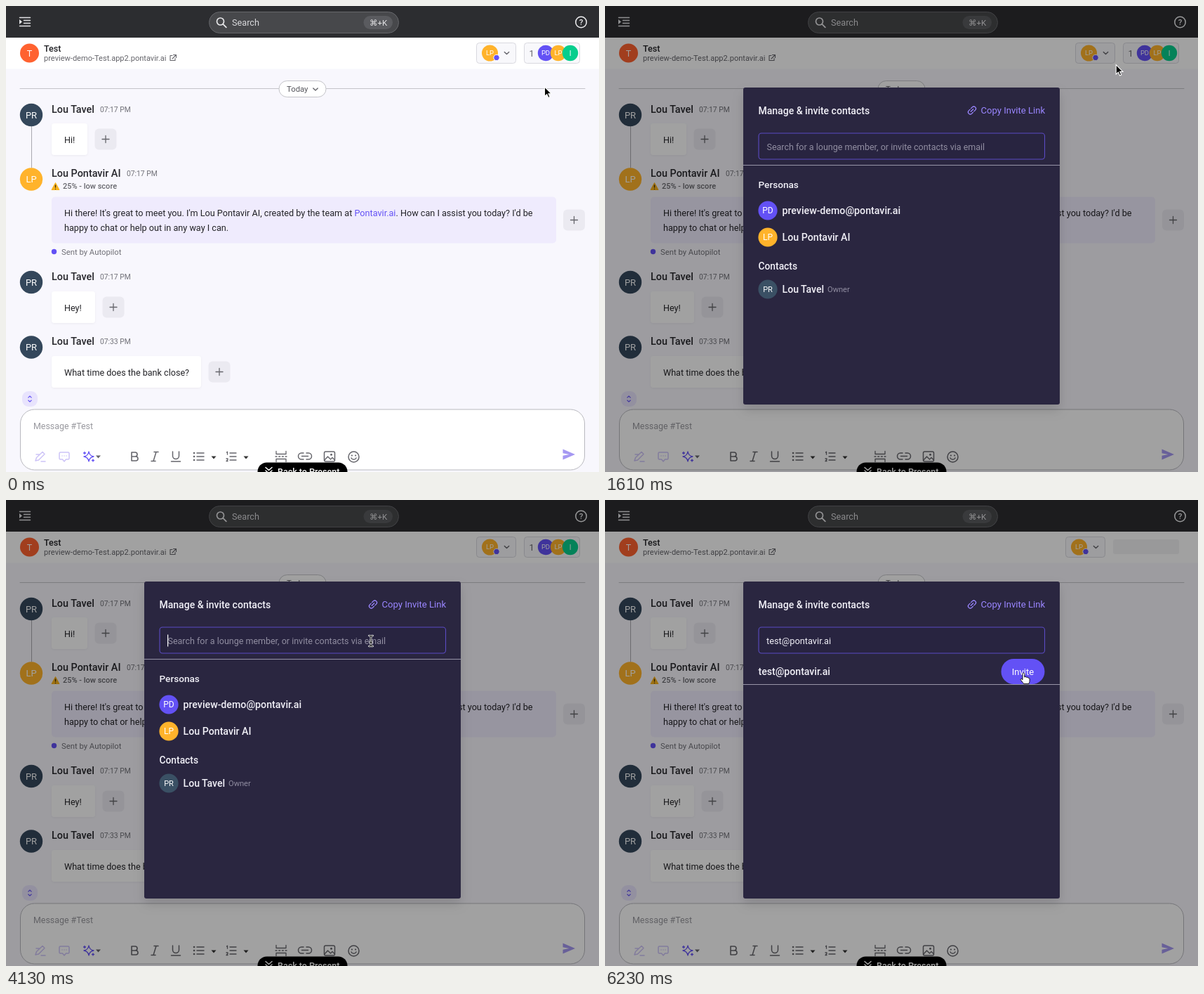
Write an HTML page that moves like this. It is 845 by 663 pixels and loops after 6.3 s.

```html
<!DOCTYPE html>
<html lang="en">
<head>
<meta charset="utf-8">
<title>Invite contacts</title>
<style>
html, body { margin: 0; width: 100%; height: 100%; overflow: hidden; background: #f8f7fd }
svg { display: block; width: 100vw; height: 100vh }
text { font: 12.6px Roboto, Arial, sans-serif; fill: #232327 }
.m { font-weight: 500 }
.mid { text-anchor: middle }
.ln { fill: none; stroke-linecap: round; stroke-linejoin: round }
</style>
</head>
<body>
<svg id="stage" viewBox="0 0 845 663"></svg>
<script>
const NAME = 'Lou Tavel', AGENT = 'Lou Pontavir AI', HOST = 'pontavir.ai';
const PURPLE = '#6351f5', ORANGE = '#ffb32b', NAVY = '#34475b';

const text = (x, y, s, size = 12.6, fill = '#232327', cls = '', more = '') =>
  `<text x="${x}" y="${y}" class="${cls}" style="font-size:${size}px;fill:${fill}" ${more}>${s}</text>`;
const rect = (x, y, w, h, r, fill, more = '') =>
  `<rect x="${x}" y="${y}" width="${w}" height="${h}" rx="${r}" fill="${fill}" ${more}/>`;
const circle = (x, y, r, fill, more = '') =>
  `<circle cx="${x}" cy="${y}" r="${r}" fill="${fill}" ${more}/>`;
const line = (d, stroke, w = 1.3, more = '') =>
  `<path class="ln" d="${d}" stroke="${stroke}" stroke-width="${w}" ${more}/>`;
const avatar = (x, y, r, fill, s, size) =>
  circle(x, y, r, fill) + text(x, y + size * .36, s, size, '#fff', 'mid');
const plus = (x, y) =>
  rect(x - 15.5, y - 15, 31, 30, 6, '#ebeaf1') + line(`M${x - 5} ${y}h10M${x} ${y - 5}v10`, '#66666c');
const chevron = (x, y, c = '#66666c') => line(`M${x - 3.2} ${y - 1.6}l3.2 3.2 3.2-3.2`, c, 1.4);
const caretDown = (x, y, c = '#333') => `<path d="M${x - 3.5} ${y - 2}h7l-3.5 4z" fill="${c}"/>`;
const at = (x, y, body) => `<g transform="translate(${x} ${y})">${body}</g>`;

const sender = (y, name, time, fill = NAVY, initials = 'PR', timeX = 134) =>
  avatar(36, y, 16.2, fill, initials, 13) +
  text(65, y - 3.5, name, 14.4, '#26262b', 'm') + text(timeX, y - 4.5, time, 10.3, '#707077');
const bubble = (y, w, s) =>
  rect(65, y, w, 45, 4, '#fff', 'filter="url(#soft)"') + text(83, y + 27.5, s) + plus(65 + w + 26, y + 22.5);

const topBar =
  rect(0, 0, 845, 45, 0, '#2c2d30') +
  line('M19.5 16.5h15M25.5 20.5h9M25.5 24.5h9M19.5 28.5h15', '#e4e4e6', 1.5) +
  '<path d="M19 19l4 3.5-4 3.5z" fill="#e4e4e6"/>' +
  rect(289.5, 8.5, 270, 30, 15, '#47484b', 'stroke="#66676b"') +
  circle(305.5, 22, 5, 'none', 'stroke="#e8e8ea" stroke-width="1.7"') +
  line('M309.3 25.8l4.5 4.5', '#e8e8ea', 1.8) +
  text(322, 28, 'Search', 12.7, '#dadadd') +
  rect(509.5, 14, 41.5, 19, 9.5, '#5a5b5f') +
  text(530.5, 28, '⌘+K', 11.5, '#e4e4e6', 'mid') +
  circle(819.5, 23, 7.7, 'none', 'stroke="#f0f0f2" stroke-width="1.5"') +
  text(819.5, 27.3, '?', 11.5, '#f0f0f2', 'mid m');

const header =
  rect(0, 45, 845, 44.5, 0, '#fff') +
  avatar(33.5, 67, 13.5, '#ff6230', 'T', 12.5) +
  text(54, 64.7, 'Test', 12.6, '#232327', 'm') +
  text(54, 78.2, 'preview-demo-Test.app2.' + HOST, 11.05, '#65656b') +
  line('M237 70.5h-3v7h7v-3M238.5 69.5h4v4M242 70l-5 5', '#65656b', 1.1) +
  `<g id="picker">${rect(670.5, 52.5, 56, 29, 4, '#f8f8fb', 'stroke="#d9d9df"')}
    ${avatar(689.5, 67, 11.5, ORANGE, 'LP', 9.5)}
    ${circle(699, 73.5, 4.2, PURPLE, 'stroke="#fff" stroke-width="1"')}${chevron(713.5, 67)}</g>` +
  `<g id="members">${rect(738.5, 52.5, 79, 29, 4, '#f8f8fb', 'stroke="#d9d9df"')}
    ${text(745.5, 71.5, '1', 12.5, '#66666c')}
    <g id="faces">${avatar(769, 67, 11.2, PURPLE, 'PD', 9.5)}${avatar(787, 67, 11.2, ORANGE, 'LP', 9.5)}
    ${avatar(804, 67, 11.2, '#06ce8d', 'I', 10)}</g></g>` +
  rect(724, 56, 94, 21, 3, '#f2f2f4', 'id="loading"');

const greeting = `Hi there! It's great to meet you. I'm ${AGENT}, created by the team at ` +
  `<tspan style="fill:${PURPLE}">Pontavir.ai</tspan>. How can I assist you today? I'd be`;

const chat =
  line('M20 117.5H825', '#c4c4c9', 1) +
  rect(389, 106.5, 67, 23, 11.5, '#fff', 'stroke="#c4c4c9"') +
  text(400, 122, 'Today', 11.3, '#55555b') + chevron(441, 118.5) +
  line('M36.5 171V230', '#a9a9b0', 1) +
  sender(155, NAME, '07:17 PM') + bubble(167, 51, 'Hi!') +
  sender(246.5, AGENT, '07:17 PM', ORANGE, 'LP', 172) +
  '<path d="M70.5 251.5l5.5 10h-11z" fill="#f8b31d" stroke="#f8b31d" stroke-linejoin="round"/>' +
  line('M70.5 255v3M70.5 260.3v.1', '#3a2c10', 1.3) +
  text(81, 260, '25% - low score', 11, '#66666c', 'm') +
  rect(65, 271.5, 719, 66, 5, '#efebfd') +
  text(83, 298.5, greeting, 12.65) +
  text(83, 320, 'happy to chat or help out in any way I can.', 12.65) +
  plus(809.5, 304.5) +
  circle(68.5, 349.5, 3.7, PURPLE) + text(79, 353.7, 'Sent by Autopilot', 11.3, '#707077') +
  sender(393, NAME, '07:17 PM') + bubble(406, 62, 'Hey!') +
  sender(485.5, NAME, '07:33 PM') + bubble(498, 213, 'What time does the bank close?') +
  rect(23, 548, 22, 22, 9, '#e8e3fd') +
  line('M31.8 557.2l2.2-2.2 2.2 2.2M31.8 561l2.2 2.2 2.2-2.2', PURPLE, 1.1);

const INK = '#66666c', PALE = '#cdc3f7';
const composer =
  rect(20.5, 574, 804, 86, 20, '#fff', 'stroke="#b9b9bf"') +
  text(39, 602, 'Message #Test', 12.4, '#98989e') +
  at(49, 641, line('M-7 6l1.5-4.5L3-6.5l3 3L-2.5 5zM1 7h6M-6-3h4', PALE, 1.5)) +
  at(83, 641, line('M-5.5-6h11q1.5 0 1.5 1.5v7q0 1.5-1.5 1.5h-3L0 7l-2.5-3h-3Q-7 4-7 2.5v-7Q-7-6-5.5-6zM-3-1h.1M0-1h.1M3-1h.1', PALE, 1.5)) +
  at(118, 641, line('M0-7Q1-1 7 0 1 1 0 7-1 1-7 0-1-1 0-7zM-6-6.5v3M-7.5-5h3M6 4v3M4.5 5.5h3', PURPLE, 1.3)) +
  caretDown(131.5, 641.5, INK) +
  at(183, 641, line('M-4-6H1a3 3 0 010 6h-5zM-4 0H2a3 3 0 010 6h-6z', INK, 1.6)) +
  at(212, 641, line('M-1-6.5h6M-5 6.5h6M2-6.5l-4 13', INK, 1.5)) +
  at(242, 641, line('M-4.5-7v6a4.500 4.500 0 009 0v-6M-6.5 7h13', INK, 1.5)) +
  at(274, 641, line('M-2-5H8M-2 0H8M-2 5H8', INK, 1.5) + line('M-6-5h.1M-6 0h.1M-6 5h.1', INK, 2.6)) +
  caretDown(296, 642.5) +
  at(321, 641, line('M-2-5H7M-2 0H7M-2 5H7M-6.5-6l1-.8v4M-7 3h2v1.5l-2 2h2', INK, 1.3)) +
  caretDown(342, 642.5) +
  at(392, 641, line('M-7-7.5v4h14v-4M-7 7.5v-4h14v4', INK, 1.3) +
    line('M-8 0h16', INK, 1.3, 'stroke-dasharray="2 2.7"')) +
  at(426, 640.5, line('M-2-4.5h-3a4.500 4.500 0 000 9h3M2-4.5h3a4.500 4.500 0 010 9h-3M-4.500 0h9', INK, 1.5)) +
  at(461, 641, rect(-7.5, -7, 15, 14, 2, 'none', `stroke="${INK}" stroke-width="1.5"`) +
    line('M-7 5l4.5-5 4 4 2.5-2.5 3 3', INK, 1.4) + circle(2.5, -2.8, 1.5, INK)) +
  at(495.5, 641.5, circle(0, 0, 7.5, 'none', `stroke="${INK}" stroke-width="1.5"`) +
    line('M-3.5 1.5a3.800 3.800 0 007 0', INK, 1.4) + circle(-2.6, -2, 1.1, INK) + circle(2.6, -2, 1.1, INK)) +
  '<path d="M793.5 630.5l17.5 7.5-17.5 7.5v-5.8l9-1.7-9-1.7z" fill="#a598f2"/>' +
  rect(358.5, 649.5, 128, 26, 13, '#000') +
  line('M370 656.5l4.5 4 4.5-4M370 661l4.5 4 4.5-4', '#fff', 1.5) +
  text(387, 667, 'Back to Present', 12.5, '#fff', 'm');

const LIGHT = '#f1f0f7', RULE = '#9895a8', LINK = '#9a86ff';
const modal = `<g id="modal">${rect(0, 0, 845, 663, 0, '#000', 'opacity=".37"')}
  ${rect(197, 116, 451, 451, 3, '#2a2640', 'filter="url(#drop)"')}
  ${text(218.5, 153.5, 'Manage &amp; invite contacts', 14, LIGHT, 'm')}
  ${at(523, 148.5, `<g transform="rotate(-45)">${line('M-1-3h-2.5a3 3 0 000 6h2.5M1-3h2.5a3 3 0 010 6H1M-2.5 0h5', LINK, 1.3)}</g>`)}
  ${text(535.5, 153, 'Copy Invite Link', 13.1, LINK)}
  ${rect(219, 181, 407.5, 37, 4, '#282440', 'stroke="#5b4bc4" stroke-width="1.1"')}
  <g id="lists">${text(230.5, 204.7, 'Search for a lounge member, or invite contacts via email', 12.5, '#918ea1')}
    ${line('M197 226.5H648', RULE, 1)}
    ${text(218.5, 259.2, 'Personas', 13.6, LIGHT, 'm')}
    ${avatar(232, 291, 13.6, PURPLE, 'PD', 12)}${text(252.5, 296.3, 'preview-demo@' + HOST, 14.2, LIGHT, 'm')}
    ${avatar(232, 329, 13.6, ORANGE, 'LP', 12)}${text(252.5, 334.3, AGENT, 14.2, LIGHT, 'm')}
    ${text(218.5, 375, 'Contacts', 13.8, LIGHT, 'm')}
    ${avatar(232, 403, 13.6, '#3a5064', 'PR', 11)}${text(252.5, 408.3, NAME, 14.1, LIGHT, 'm')}
    ${text(317, 407.3, 'Owner', 11.1, '#918ea1')}</g>
  <g id="result">${text(230, 204.7, 'test@' + HOST, 12.8, LIGHT, '', 'id="typed"')}
    ${text(218.5, 249.2, 'test@' + HOST, 14.1, LIGHT, 'm')}
    ${rect(564.5, 226, 62, 36, 18, PURPLE)}${text(595.5, 248.6, 'Invite', 13, '#fff', 'mid')}
    ${line('M197 262.5H648', RULE, 1)}</g>
  ${rect(0, 191.5, 1.2, 17, 0, '#fff', 'id="caret"')}</g>`;

const beam = 'M-2.5-7.5Q0-7.5 0-6 0-7.5 2.5-7.5M0-6V6M-2.5 7.5Q0 7.5 0 6 0 7.5 2.5 7.5M-1.500 2H1.500';
const pointers = `<g id="pointer">
  <path id="arrow" d="M0 0V13.5L3.2 10.6 5.4 15.5 7.6 14.5 5.5 9.8H9.8Z" fill="#000" stroke="#fff" stroke-width="1.1"/>
  <path id="hand" d="M-1.5 0C-1.5-2 1.3-2 1.3 0V4.5C3 3.5 4 4 4.3 5 5.5 4.3 6.5 4.8 6.8 5.800 8 5.500 8.600 6.100 8.600 7.500V10C8.600 12 7.500 12.500 7.500 14H0C-.5 12.500-2 11.500-4 8.700-5 7.300-3.500 6.300-2.300 7.500L-1.500 8.300Z" fill="#fff" stroke="#111" stroke-linejoin="round"/>
  <g id="beam">${line(beam, '#fff', 2.7)}${line(beam, '#111', 1.2)}</g></g>`;

document.getElementById('stage').innerHTML = `<defs>
  <filter id="soft" x="-20%" y="-20%" width="140%" height="150%"><feDropShadow dx="0" dy="1" stdDeviation="1.5" flood-opacity=".05"/></filter>
  <filter id="drop"><feDropShadow dx="0" dy="8" stdDeviation="8" flood-opacity=".13"/></filter></defs>` +
  rect(0, 0, 845, 663, 0, '#f8f7fd') + topBar + header + chat + composer + modal + pointers;

const LOOP = 6300, STEP = 70, OPEN = 980, FOUND = 4970;
const $ = id => document.getElementById(id);
const show = (id, on) => $(id).setAttribute('display', on ? 'inline' : 'none');

// Pointer stops: time, x, y
const path = [
  [0, 767.5, 115], [280, 775, 65.5], [910, 775, 65.5], [1400, 775, 65], [2030, 594.5, 136.5],
  [2170, 594, 138], [2800, 525, 189], [2940, 520, 200.5], [4900, 520, 200.5],
  [5460, 586, 241.5], [5600, 588, 243], [6230, 596.5, 247.5]
];

function pointerAt(t) {
  const i = path.findIndex(p => p[0] > t);
  if (i < 0) return path[path.length - 1].slice(1);
  const [t0, x0, y0] = path[i - 1], [t1, x1, y1] = path[i];
  const u = (t - t0) / (t1 - t0), k = u * u * (3 - 2 * u);
  return [x0 + (x1 - x0) * k, y0 + (y1 - y0) * k];
}

const inside = (x, y, l, t, r, b) => x >= l && x <= r && y >= t && y <= b;

function shapeAt(x, y, t) {
  if (t < OPEN) return inside(x, y, 738, 52, 818, 82) ? 'hand' : 'arrow';
  if (inside(x, y, 219, 181, 626, 218)) return 'beam';
  const link = inside(x, y, 514, 134, 628, 162);
  const invite = t >= FOUND && inside(x, y, 564, 226, 626, 262);
  return link || invite ? 'hand' : 'arrow';
}

function draw(now) {
  const t = Math.floor(now % LOOP / STEP) * STEP;
  const found = t >= FOUND;
  show('modal', t >= OPEN);
  show('lists', !found);
  show('result', found);
  show('members', !found);
  show('loading', found);
  $('picker').setAttribute('transform', `translate(${found ? -14 : 0} 0)`);
  $('faces').setAttribute('opacity', t >= 630 && t < OPEN ? .8 : 1);

  show('caret', found ? t < 5775 : (t - OPEN) % 1050 < 490);
  $('caret').setAttribute('x', found ? 230 + $('typed').getComputedTextLength() : 230);

  const [x, y] = pointerAt(t), shape = shapeAt(x, y, t);
  $('pointer').setAttribute('transform', `translate(${x} ${y})`);
  for (const id of ['arrow', 'hand', 'beam']) show(id, id === shape);
}

const start = performance.now();
function tick() {
  draw(performance.now() - start);
  requestAnimationFrame(tick);
}
tick();
</script>
</body>
</html>
```
